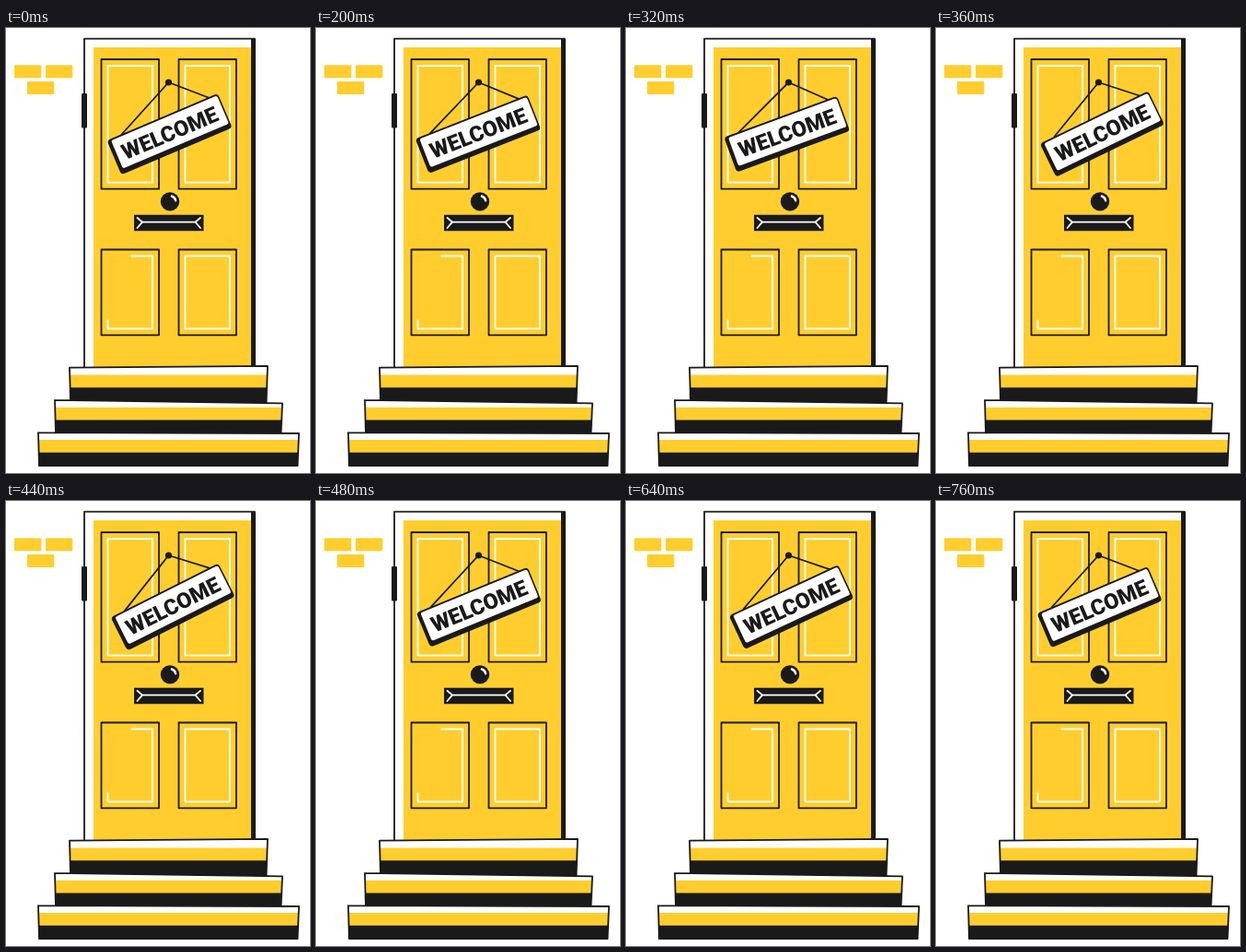
These frames come from a looping animation (330 px wide and 483 px high, 0.96 s). An HTML page with a canvas:

```html
<!DOCTYPE html>
<html lang="en">
<head>
<meta charset="utf-8">
<title>Welcome door</title>
<style>
  html, body { margin: 0; width: 100%; height: 100%; overflow: hidden; background: #fff; }
  canvas { display: block; width: 330px; height: 483px; }
</style>
</head>
<body>
<canvas id="stage"></canvas>
<script>
const W = 330, H = 483, LOOP = 960, STEP = 40, DEG = Math.PI / 180;
const INK = '#1a1a1a', GOLD = '#ffce2e', PAPER = '#fff', THIN = 1.8;
const PIN = { x: 176.5, y: 59 };

const canvas = document.getElementById('stage');
const ratio = window.devicePixelRatio || 1;
canvas.width = W * ratio;
canvas.height = H * ratio;
const ctx = canvas.getContext('2d');
ctx.scale(ratio, ratio);
ctx.lineCap = ctx.lineJoin = 'round';

function trace(points) {
  ctx.beginPath();
  points.forEach(([x, y]) => ctx.lineTo(x, y));
}

function fill(color, ...points) {
  trace(points);
  ctx.fillStyle = color;
  ctx.fill();
}

function line(color, ...points) {
  trace(points);
  ctx.strokeStyle = color;
  ctx.lineWidth = THIN;
  ctx.stroke();
}

function box(color, x, y, w, h, r = 0) {
  ctx.beginPath();
  ctx.roundRect(x, y, w, h, r);
  ctx.fillStyle = color;
  ctx.fill();
}

function frame(color, x, y, w, h) {
  ctx.strokeStyle = color;
  ctx.lineWidth = THIN;
  ctx.strokeRect(x, y, w, h);
}

function disc(color, x, y, r) {
  ctx.beginPath();
  ctx.arc(x, y, r, 0, 2 * Math.PI);
  ctx.fillStyle = color;
  ctx.fill();
}

// Outlined door panel; a worn one keeps only part of its inner line
function drawPanel(x, y, h, worn) {
  const w = 62.5, gap = 7;
  const l = x + gap, t = y + gap, r = x + w - gap, b = y + h - gap;
  frame(INK, x, y, w, h);
  if (worn) line(PAPER, [l + 26, t], [r, t], [r, b], [l, b], [l, b - 9]);
  else frame(PAPER, l, t, r - l, b - t);
}

function drawKnob(x, y) {
  disc(INK, x, y, 10.2);
  ctx.beginPath();
  ctx.arc(x, y, 6.2, -72 * DEG, -9 * DEG);
  ctx.strokeStyle = PAPER;
  ctx.lineWidth = 2.4;
  ctx.stroke();
}

function drawSlot(x, y, w, h) {
  const mid = y + h * 0.45;
  box(INK, x, y, w, h);
  line(PAPER, [x + 9, mid], [x + w - 9, mid]);
  for (const [end, side] of [[x, 1], [x + w, -1]])
    line(PAPER, [end + side * 3.5, y + 3.3], [end + side * 9, mid], [end + side * 3.5, y + h - 3.3]);
}

function drawDoor() {
  box(PAPER, 85, 11, 186, 357);
  box(GOLD, 95, 21, 172, 347);
  box(INK, 266, 12, 5, 356);
  line(INK, [85, 368], [85, 11.6], [270, 11.6]);
  box(INK, 82, 71, 6, 37.5, 1);
  for (const x of [103.5, 187.5]) {
    drawPanel(x, 34, 140.7, false);
    drawPanel(x, 240.5, 92.8, x < PIN.x);
  }
  drawKnob(178, 188.4);
  drawSlot(139, 202.7, 75.5, 17.6);
}

// Stairs widen downwards; tilt is how far each right end drops
function drawStairs() {
  const tilt = [-1.8, 3.5, 0.8, 0];
  for (let i = 0; i < 3; i++) {
    const y = 368.6 + 35.3 * i, half = 107.5 + i * (15 + i);
    const l = PIN.x - half, r = PIN.x + half, foot = y + 36;
    const outline = [[l, y], [r, y + tilt[i]], [r - 1.5, foot + tilt[i + 1]], [l + 1, foot]];
    fill(PAPER, ...outline);
    ctx.save();
    ctx.clip();
    box(GOLD, l, y + 7.9, 2 * half, 40);
    box(INK, l, y + 21.6, 2 * half, 40);
    ctx.restore();
    line(INK, ...outline, outline[0]);
  }
}

function drawScene() {
  box(PAPER, 0, 0, W, H);
  for (const [x, y] of [[9, 40.3], [43, 40.3], [23, 58]]) box(GOLD, x, y, 29.3, 14, 1);
  drawDoor();
  drawStairs();
}

function drawSign(degrees) {
  ctx.save();
  ctx.translate(PIN.x, PIN.y);
  ctx.rotate(degrees * DEG);
  line(INK, [-51, 56.5], [0, 0], [44.5, 17]);

  ctx.translate(1.2, 55);
  ctx.rotate(-23 * DEG);
  box(INK, -66, -19.2, 130.8, 40.5, 4);
  box(PAPER, -61.8, -17.3, 125, 33, 2.5);
  ctx.font = '900 23.5px Roboto, Inter, sans-serif';
  ctx.textAlign = 'center';
  ctx.fillStyle = INK;
  ctx.fillText('WELCOME', 0, 8.3);
  ctx.restore();
  disc(INK, PIN.x, PIN.y, 3.6);
}

// Decaying swing: an eased move to the next angle every beat
const SWING = [0, 6, -6, 3, -2, 0], START = 160, BEAT = 120;

function angleAt(ms) {
  const p = (ms - START) / BEAT;
  if (p <= 0 || p >= SWING.length - 1) return 0;
  const i = Math.floor(p), u = p - i;
  return SWING[i] + (SWING[i + 1] - SWING[i]) * u * u * (3 - 2 * u);
}

const begin = performance.now();

function tick() {
  const t = Math.max(0, performance.now() - begin) % LOOP;
  drawScene();
  drawSign(angleAt(Math.floor(t / STEP) * STEP));
  requestAnimationFrame(tick);
}
tick();
</script>
</body>
</html>
```
